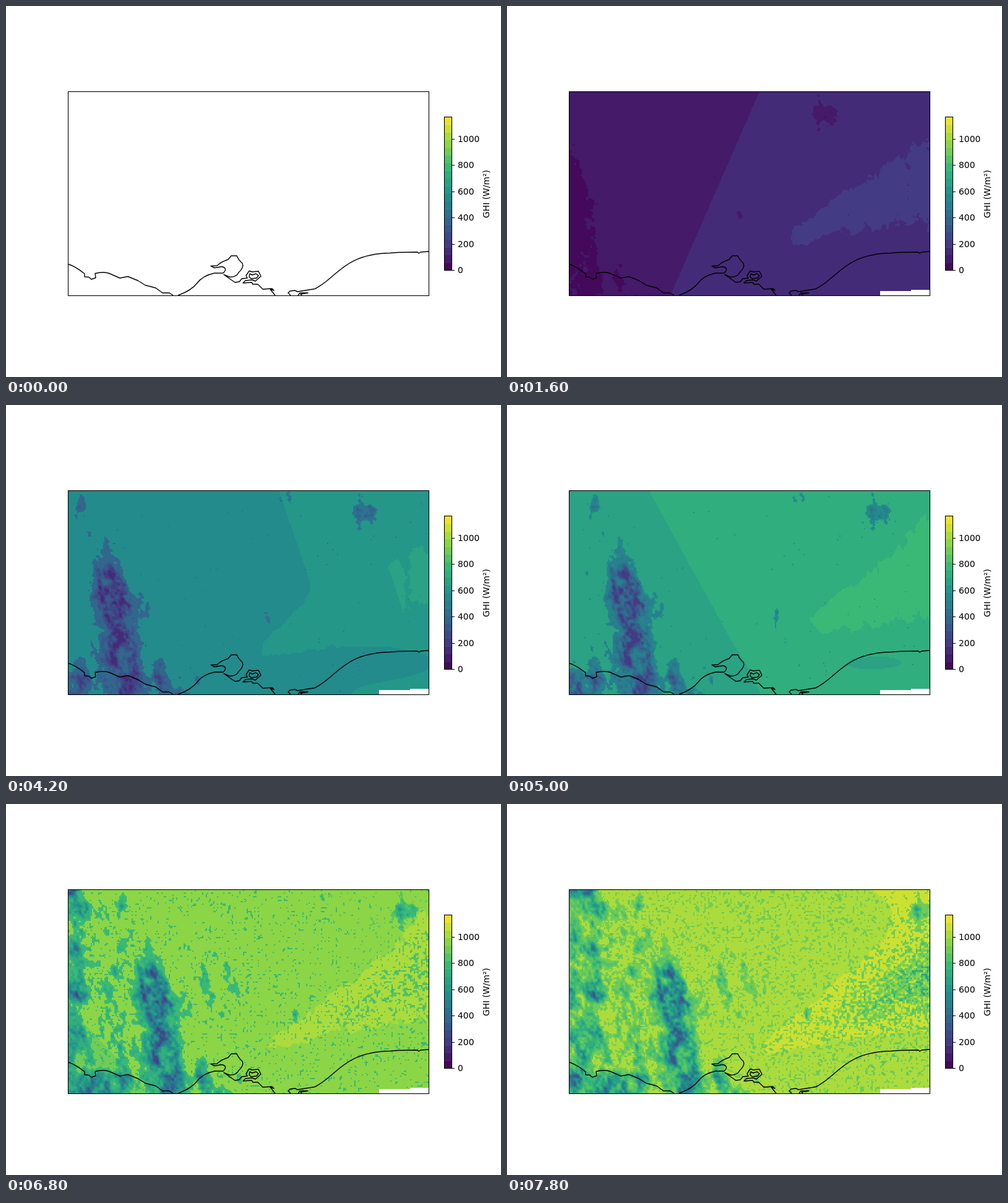
These frames come from a looping animation (800x600 px, 8000 ms). An HTML page with a canvas:

```html
<!DOCTYPE html>
<html lang="en">
<head>
<meta charset="utf-8">
<title>Irradiance map</title>
<style>
  html, body { margin: 0; width: 100%; height: 100%; overflow: hidden; background: #fff; }
  canvas { position: absolute; left: 101px; top: 139px; width: 582px; height: 330px; image-rendering: pixelated; }
  svg { position: absolute; left: 0; top: 0; }
  text { font: 13.89px "DejaVu Sans", sans-serif; }
</style>
</head>
<body>
<canvas id="map" width="291" height="165"></canvas>
<svg width="800" height="600" viewBox="0 0 800 600">
  <g fill="none" stroke="#000" stroke-width="1.4" stroke-linejoin="round">
    <!-- mainland, west to east -->
    <path d="M100.5 417.5Q112 421 127 433L127 438 134 438.5 138 442 145 439.5 144 432.5Q158 429 167 432.5L184 440 197 437.5 213 444 225 451.5 242 456 253 464 264 464 270 468"/>
    <path d="M278 468Q300 460 309 448T337 432L351 432Q359 424 349 421.5L337 423.5 331 420.5 341 420Q347 414 359 410L364 404 373 404Q376 411 382 416 385 423 376 431 373 438 362 438.5L352 434.5 370 447 377 446 381 441 390 440 388 436 393 428.5 398 430 408 429 412 437 403 445 398 443 387 444 383 448 397 447 399 450 407 450 415 458 430 457 433 460 427 458 435 468"/>
    <path d="M460 468L456 464 459 461 467 460 471 462 499 457.5C535 440 545 401 621 399.5L634 398.5 665 398 667 400 670 398 683 397"/>
    <!-- lagoons -->
    <path d="M394 433L398 435 404 433 408 436 405 440 396 441 393 438ZM472 468L475 464 488 464 476 466 478 468"/>
  </g>
  <rect x="100.5" y="138.5" width="583" height="330" fill="none" stroke="#000" stroke-width="1.1"/>
  <g id="bar"></g>
  <text transform="translate(781 304) rotate(-90)" text-anchor="middle">GHI (W/m²)</text>
</svg>
<script>
const STEP = 200, FRAMES = 40, COLS = 291, ROWS = 165, LEVELS = 20;
const STOPS = ['440154', '443983', '31688e', '21918c', '35b779', '90d743', 'fde725']
  .map(h => [0, 2, 4].map(i => parseInt(h.slice(i, i + 2), 16)));

// small clouds: position at step 29, radii
const PUFFS = [
  { x: 165, y: 165, rx: 14, ry: 30 },
  { x: 620, y: 180, rx: 22, ry: 32 },
  { x: 490, y: 150, rx: 18, ry: 15 },
  { x: 450, y: 340, rx: 7, ry: 18 }
];

const clamp = (v, lo = 0, hi = 1) => Math.min(hi, Math.max(lo, v));
const ramp = (from, to, v) => clamp((v - from) / (to - from));
const bump = (u, v = 0) => Math.exp(-u * u - v * v);

const palette = Array.from({ length: LEVELS }, (_, i) => {
  const at = (i + .5) / LEVELS * (STOPS.length - 1), k = Math.floor(at);
  return STOPS[k].map((v, j) => Math.round(v + (STOPS[k + 1][j] - v) * (at - k)));
});

function hash(x, y) {
  let h = Math.imul(x, 374761393) ^ Math.imul(y, 668265263);
  h = Math.imul(h ^ (h >>> 13), 1274126177);
  return ((h ^ (h >>> 16)) >>> 0) / 4294967296;
}

function noise(x, y) {
  const i = Math.floor(x), j = Math.floor(y);
  let u = x - i, v = y - j;
  u *= u * (3 - 2 * u);
  v *= v * (3 - 2 * v);
  const top = hash(i, j) + u * (hash(i + 1, j) - hash(i, j));
  const low = hash(i, j + 1) + u * (hash(i + 1, j + 1) - hash(i, j + 1));
  return top + v * (low - top);
}

const fractal = (x, y) =>
  .45 * noise(x / 18, y / 34) + .32 * noise(x / 8 + 40, y / 13) + .23 * noise(x / 4, y / 5 + 70);

// the clear strip rises and widens toward the east
function clearStrip(x, y) {
  const t = (x - 430) / 240;
  const across = (y - 388 + 108 * Math.min(t, 1)) / (16 + 50 * Math.max(t, 0));
  return bump(across) * ramp(405, 440, x);
}

// how cloudy a place is, before texture
function cover(x, y, n) {
  const front = 222 + 5.2 * (n - 29);
  const dx = x - front - .15 * (y - 350);
  const late = ramp(22, 36, n);
  const band = .95 * bump(dx / (24 + .07 * (y - 139))) * ramp(150, 300, y);
  const wake = .48 * late * ramp(60, 0, dx) * ramp(120, 260, y + .3 * (n - 29) * 10);
  const flank = .5 * late * bump((dx - 95) / 60, (y - 280) / 55);
  const west = .85 * ramp(135, 95, x - 5.5 * (n - 29) + 12);
  const shore = .8 * ramp(395, 440, y) * ramp(230, 150, x - 5.4 * n + 10);
  return Math.max(band, wake, flank, west * ramp(26, 32, n), shore);
}

function puffs(x, y, n) {
  return Math.max(...PUFFS.map(p => .75 * bump((x - p.x - 5 * (n - 29) * (p.rx < 10 ? .7 : 1)) / p.rx, (y - p.y) / p.ry)));
}

// parts of the field that never move
const strip = [], boost = [], coast = [];
for (let r = 0; r < ROWS; r++) for (let c = 0; c < COLS; c++) {
  const x = 102 + 2 * c, y = 140 + 2 * r, s = clearStrip(x, y);
  strip.push(s);
  boost.push(.7 * clamp(1.5 * s * (.1 + 1.8 * fractal(x, y))));
  coast.push(.55 * bump((x - 620) / 110, (y - 415) / 28));
}

const ctx = document.getElementById('map').getContext('2d');
const image = ctx.createImageData(COLS, ROWS);

function draw(n) {
  ctx.clearRect(0, 0, COLS, ROWS);
  if (n === 0) return;

  const elevation = Math.max(0, 2.12 * n - 3.2) * Math.PI / 180;
  const base = 18.2 * Math.sin(elevation) ** 1.5;
  const east = .0023 * Math.cos((n - 17) / 54 * Math.PI);
  const south = .0013 * Math.cos(n / 30 * Math.PI);
  const edge = .6 + .007 * n, drift = Math.round(5.2 * n), haze = ramp(30, 40, n);

  for (let r = 0, p = 0; r < ROWS; r++) for (let c = 0; c < COLS; c++, p++) {
    const x = 102 + 2 * c, y = 140 + 2 * r;
    let level = base + (x - 392) * east + (y - 303) * south + boost[p] - coast[p];

    let density = 0;
    const m = Math.max(cover(x, y, n), puffs(x, y, n));
    if (m > .1) density = m - .5 + 1.5 * (fractal(x - drift - .2 * y, y) - .5);
    const grain = haze * (.14 + strip[p] * (.1 + .36 * ramp(500, 680, x)));
    if (grain > .05) density = Math.max(density, grain - .6 + noise((x - drift) / 3, y / 3) * .65);
    if (n > 10 && hash(c + n * 7, r + 500) > .9985) density = Math.max(density, .03);
    if (density > 0) level *= clamp(edge - 1.1 * density * density, .3);

    const empty = x > 602 && y > 461.5 - (x - 602) * .03;
    image.data.set(empty ? [255, 255, 255] : palette[clamp(Math.floor(level), 0, LEVELS - 1)], 4 * p);
    image.data[4 * p + 3] = 255;
  }
  ctx.putImageData(image, 0, 0);
}

let bar = palette.map((rgb, i) =>
  `<rect x="708.5" y="${427.5 - 12.4 * (i + 1)}" width="12" height="12.9" fill="rgb(${rgb})"/>`).join('');
bar += '<rect x="708.5" y="179.5" width="12" height="248" fill="none" stroke="#000" stroke-width="1.1"/>';
for (let v = 0; v <= 1000; v += 200) {
  const y = Math.round(427 - v * .212) + .5;
  bar += `<path d="M721 ${y}h4" stroke="#000" stroke-width="1.1"/><text x="730" y="${y + 4.5}">${v}</text>`;
}
document.getElementById('bar').innerHTML = bar;

let shown = -1;
function tick() {
  const n = Math.floor(performance.now() / STEP) % FRAMES;
  if (n !== shown) draw(shown = n);
  requestAnimationFrame(tick);
}
tick();
</script>
</body>
</html>
```
